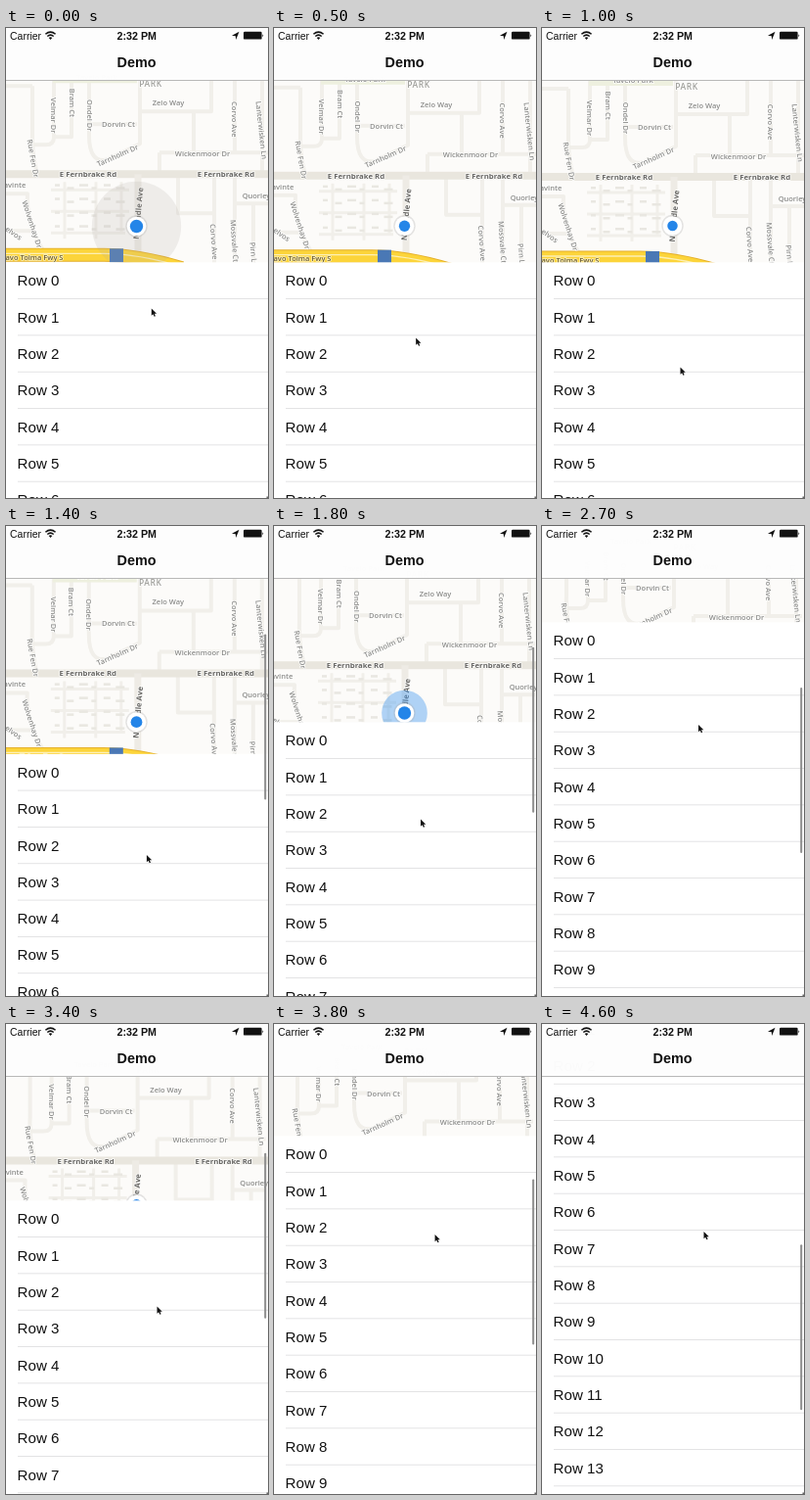
Write an HTML page that moves like this. It is 268 by 480 pixels and loops after 4700 ms.

```html
<!DOCTYPE html>
<html lang="en">
<head>
<meta charset="utf-8">
<title>Demo</title>
<style>
  html, body { margin: 0; width: 100%; height: 100%; overflow: hidden; background: #fff; }
  svg { display: block; font-family: "Liberation Sans", Arial, sans-serif; }
  .map text { font: 600 7.5px "Open Sans", "Noto Sans", sans-serif; fill: #8b8b89;
    text-anchor: middle; dominant-baseline: central;
    stroke: #fdfdfc; stroke-width: 1.5px; paint-order: stroke; }
  .map text.main { font-weight: 700; font-size: 7.8px; fill: #666562; }
  .map text.hwy { fill: #6b5b2c; stroke: #fdf1bd; }
  .map text.area { font-size: 8.5px; letter-spacing: .6px; fill: #a0a09c; }
  .road { fill: none; stroke: #f1efea; stroke-width: 4; stroke-linejoin: round; }
  .row { font-size: 15.1px; fill: #111; }
</style>
</head>
<body>
<svg width="268" height="480" viewBox="0 0 268 480">
  <rect width="268" height="480" fill="#fff"/>

  <g class="map">
    <rect width="268" height="260" fill="#fcfbf9"/>
    <g id="map">
      <path class="road" d="M49 30V114Q49 122 41 122H22M67 30V114H49M85 30V112Q85 142 104 137L137 121V30
        M85 101H134M137 88H210V30M27 62V108Q26 130 32 152M0 62H27M157 130H268M157 130V152
        M234 30V130M262 30V152M192 88V130M0 172H22Q20 200 38 230
        M213 152V250M234 152V250M253 182V250M234 182H268M176 152V192H213M0 210H28"/>
      <path class="road" d="M46 168H126M46 190H126M46 212H122M60 160V218M92 160V218M118 160V212" style="stroke-width:3"/>
      <g id="lots" fill="#e9e7e1"/>
      <path class="road" d="M-10 152H280" style="stroke:#e9e6de;stroke-width:8"/>
      <path class="road" d="M135 152V260" style="stroke:#eeebe5;stroke-width:7"/>
      <path d="M48 40H134V59H48Z" fill="#eef0df"/>
      <g fill="none">
        <path d="M-10 234.5H100Q135 234.5 180 248" stroke="#e5b02a" stroke-width="14"/>
        <path d="M-10 234.5H100Q135 234.5 180 248" stroke="#fcd43a" stroke-width="12"/>
        <path d="M-10 233H100Q135 233 180 246.5" stroke="#fdf0b4" stroke-width="1.3"/>
      </g>
      <g id="labels"></g>
      <rect x="106" y="228" width="14" height="14" fill="#4a78b5"/>
    </g>
    <g id="dot">
      <circle id="pulse"/>
      <circle r="11.2" fill="#aaa" opacity=".3"/>
      <circle r="9.8" fill="#fff"/>
      <circle id="core" fill="#2485e8"/>
    </g>
  </g>

  <g id="list">
    <rect y="239.3" width="268" height="640" fill="#fff"/>
  </g>

  <rect id="bar" x="264.2" width="2" height="169" rx="1" fill="#8b8b8b"/>

  <rect width="268" height="53" fill="#fdfdfd" fill-opacity=".99"/>
  <rect y="53" width="268" height="1" fill="#b8b8b8"/>
  <g fill="#111">
    <text x="4" y="11.6" font-size="10.5">Carrier</text>
    <text x="133.8" y="11.7" font-size="10.7" font-weight="700" text-anchor="middle">2:32 PM</text>
    <text x="133.5" y="39.5" font-size="14.4" font-weight="700" text-anchor="middle">Demo</text>
    <g fill="none" stroke="#111" stroke-width="1.5">
      <path d="M40.4 6.3Q45.5 1.9 50.6 6.3M42.3 8.5Q45.5 5.8 48.7 8.5"/>
    </g>
    <path d="M43.7 10Q45.5 8.7 47.3 10L45.5 12Z"/>
    <path d="M238.5 3.8L231 7.8L234.8 8.2L235.2 12Z"/>
    <rect x="243" y="3.8" width="18.6" height="7.8" rx="1.2"/>
    <path d="M262.4 6.2Q264.2 7.7 262.4 9.2Z"/>
  </g>
  <rect x="266.5" y="478.5" width="1.5" height="1.5" fill="#666"/>

  <path id="cursor" d="M0 0V7.2L1.7 5.7L2.9 8.3L4.1 7.8L3 5.2H5.3Z" fill="#111" stroke="#fff" stroke-width=".8" paint-order="stroke"/>
</svg>

<script>
const LOOP = 4700, STEP = 100, ROW = 37.33, LIST_TOP = 239.3, PULSE = 2200;
const $ = id => document.getElementById(id);

function set(el, attrs) {
  for (const k in attrs) el.setAttribute(k, attrs[k]);
}
function add(parent, tag, attrs, text) {
  const el = document.createElementNS("http://www.w3.org/2000/svg", tag);
  set(el, attrs);
  if (text) el.textContent = text;
  parent.append(el);
}

// text, centre x, centre y, angle, class
const labels = [
  ["Tavelo Park", 93, 53, 0], ["PARK", 148, 59, 0, "area"],
  ["Zelo Way", 166, 79, 0], ["Dorvin Ct", 115, 101, 0],
  ["Velmar Dr", 49, 92, 90], ["Bram Ct", 67.5, 79, 90], ["Ondel Dr", 85.5, 92, 90],
  ["Corvo Ave", 234, 96, 90], ["Lanterwisken Ln", 261.5, 107, 84],
  ["Rue Fen Dr", 28, 136, 80], ["Tarnholm Dr", 114, 132.5, -24],
  ["Wickenmoor Dr", 201, 130.5, 0],
  ["E Fernbrake Rd", 84, 152, 0, "main"], ["E Fernbrake Rd", 225, 152, 0, "main"],
  ["avinte", 9, 163, 0], ["Quorley", 256, 174, 0],
  ["Wolvenhay Dr", 27, 203, 72], ["elvos", 8, 212, 35],
  ["N Brindle Ave", 135, 192, -85, "main"],
  ["Corvo Ave", 213, 221, 86], ["Mossvale Ct", 234, 220, 86], ["Pirn Ln", 253.5, 234, 84],
  ["avo Tolma Fwy S", 29, 236.5, 0, "hwy"]
];
for (const [text, x, y, turn, cls = ""] of labels)
  add($("labels"), "text", { transform: `translate(${x} ${y}) rotate(${turn})`, class: cls }, text);

for (let i = 0; i < 24; i++)
  add($("lots"), "rect", {
    x: 50 + i % 6 * 12.5, y: 162 + Math.floor(i / 6) * 14 + i % 2 * 3,
    width: 5 + i % 3 * 2, height: 2.5
  });

for (let i = 0; i < 17; i++) {
  const y = LIST_TOP + i * ROW;
  add($("list"), "text", { x: 11.6, y: y + 24, class: "row" }, "Row " + i);
  add($("list"), "rect", { x: 12, y: y + ROW - .5, width: 256, height: .8, fill: "#dcdcde" });
}

// time, scroll, map x, map y, dot y, cursor x, cursor y
const keys = [
  [0, 0, 0, -2.7, 202.5, 148.8, 286.5],
  [1000, 0, 0, 0, 202, 141.5, 346.5],
  [1200, 0, 0, 0, 202, 142, 345],
  [1800, 39, -1, -9.8, 191, 150, 299.5],
  [2700, 141, -2, -38, 163, 160, 203],
  [3400, 59, -2.4, -12.5, 184.5, 154.5, 288.5],
  [3800, 125, -3, -30.5, 168, 164.6, 215],
  [4200, 238, -3, -58, 140, 165.5, 212],
  [4600, 290, -3, -71, 127, 165.5, 212]
];

// Monotone cubic: smooth through the keys, level at turning points.
const slope = (i, c) => (keys[i + 1][c] - keys[i][c]) / (keys[i + 1][0] - keys[i][0]);
function tangent(i, c) {
  if (i === 0 || i === keys.length - 1) return 0;
  const a = slope(i - 1, c), b = slope(i, c);
  return a * b > 0 ? 2 * a * b / (a + b) : 0;
}
function sample(t, c) {
  let i = 0;
  while (i < keys.length - 2 && t >= keys[i + 1][0]) i++;
  const h = keys[i + 1][0] - keys[i][0], u = (t - keys[i][0]) / h, v = 1 - u;
  return keys[i][c] * (1 + 2 * u) * v * v + tangent(i, c) * h * u * v * v
    + keys[i + 1][c] * u * u * (3 - 2 * u) - tangent(i + 1, c) * h * u * u * v;
}

const move = (id, x, y) => set($(id), { transform: `translate(${x} ${y})` });

// The halo spreads and fades while the blue core breathes.
function drawPulse(t) {
  const p = Math.min(1, (t + 600) % PULSE / 700);
  set($("pulse"), {
    r: 12.2 + 39 * p,
    fill: p > .8 ? "#a9a79f" : "#3d94ee",
    opacity: .48 * Math.sqrt(1 - p)
  });
  set($("core"), { r: 6 + .8 * Math.cos((t + 200) / PULSE * 2 * Math.PI) });
}

function draw(t) {
  const [scroll, mapX, mapY, dotY, curX, curY] = [1, 2, 3, 4, 5, 6].map(c => sample(t, c));
  move("map", mapX, mapY);
  move("dot", 133.5, dotY);
  move("list", 0, -scroll);
  move("cursor", curX, curY);
  set($("bar"), { y: 108 + .404 * scroll, opacity: t > 1200 ? 1 : 0 });
  drawPulse(t);
}

const start = performance.now();
function tick() {
  const t = (performance.now() - start) % LOOP;
  draw(Math.floor(t / STEP) * STEP);
  requestAnimationFrame(tick);
}
tick();
</script>
</body>
</html>
```
